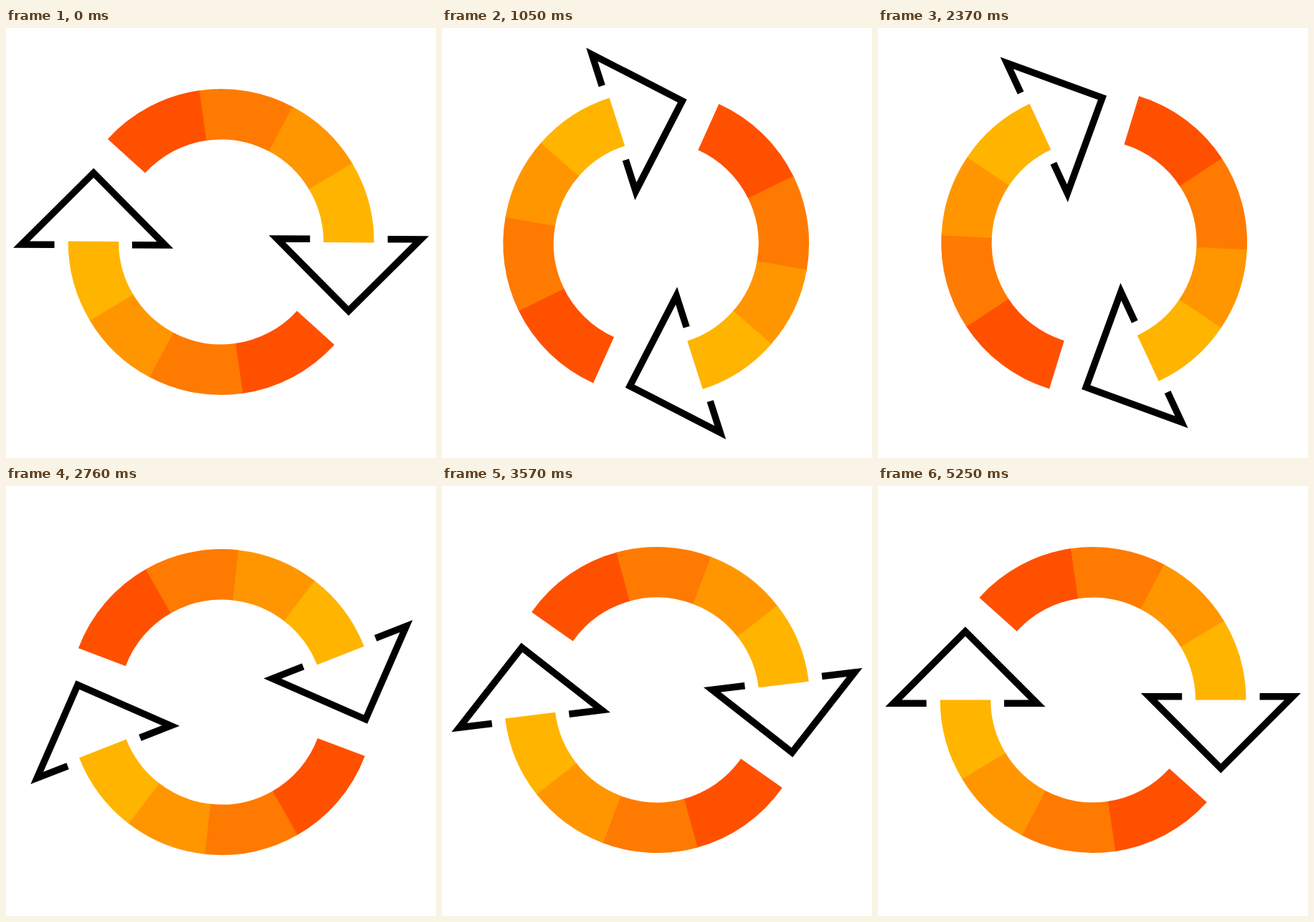
An HTML page for the animation above (5400 ms loop, 600 by 600 pixels).

```html
<!DOCTYPE html>
<html lang="en">
<head>
<meta charset="utf-8">
<title>Cycle arrows</title>
<style>
  html, body { margin: 0; height: 100%; overflow: hidden; background: #fff; }
  svg { display: block; width: 100%; height: 100%; }
</style>
</head>
<body>
<svg viewBox="0 0 600 600">
  <defs>
    <g id="half" fill="none">
      <g id="arc" stroke-width="70.5"></g>
      <path d="M424.2 293.7H378.2L478.4 394L578.6 293.7H532.6" stroke="#000" stroke-width="9.5"/>
    </g>
  </defs>
  <g id="wheel">
    <use href="#half"/>
    <use href="#half" transform="rotate(180 300.1 298.5)"/>
  </g>
</svg>
<script>
const LOOP = 5400, TURN = 1500, SECOND_START = 2100;
const OVERLAP = 0.4; // degrees tucked under the next segment to hide seams
const edges = [222, 261.6, 297.65, 328.85, 360];
const colors = ['#ff5000', '#ff7a00', '#ff9600', '#ffb400'];

const arc = document.getElementById('arc');
const wheel = document.getElementById('wheel');

function point(degrees) {
  const a = degrees * Math.PI / 180, r = 178.25;
  return `${300 + r * Math.cos(a)} ${298.5 + r * Math.sin(a)}`;
}

colors.forEach((color, i) => {
  const end = Math.min(edges[i + 1] + OVERLAP, 360);
  const path = document.createElementNS('http://www.w3.org/2000/svg', 'path');
  path.setAttribute('d', `M${point(edges[i])}A178.25 178.25 0 0 1 ${point(end)}`);
  path.setAttribute('stroke', color);
  arc.append(path);
});

// Two steady full turns per loop, each followed by a rest.
function draw() {
  const t = performance.now() % LOOP;
  const elapsed = t < SECOND_START ? t : t - SECOND_START;
  const angle = 360 * Math.min(elapsed / TURN, 1);
  wheel.setAttribute('transform', `rotate(${angle} 300.2 300.1)`);
  requestAnimationFrame(draw);
}
draw();
</script>
</body>
</html>
```
